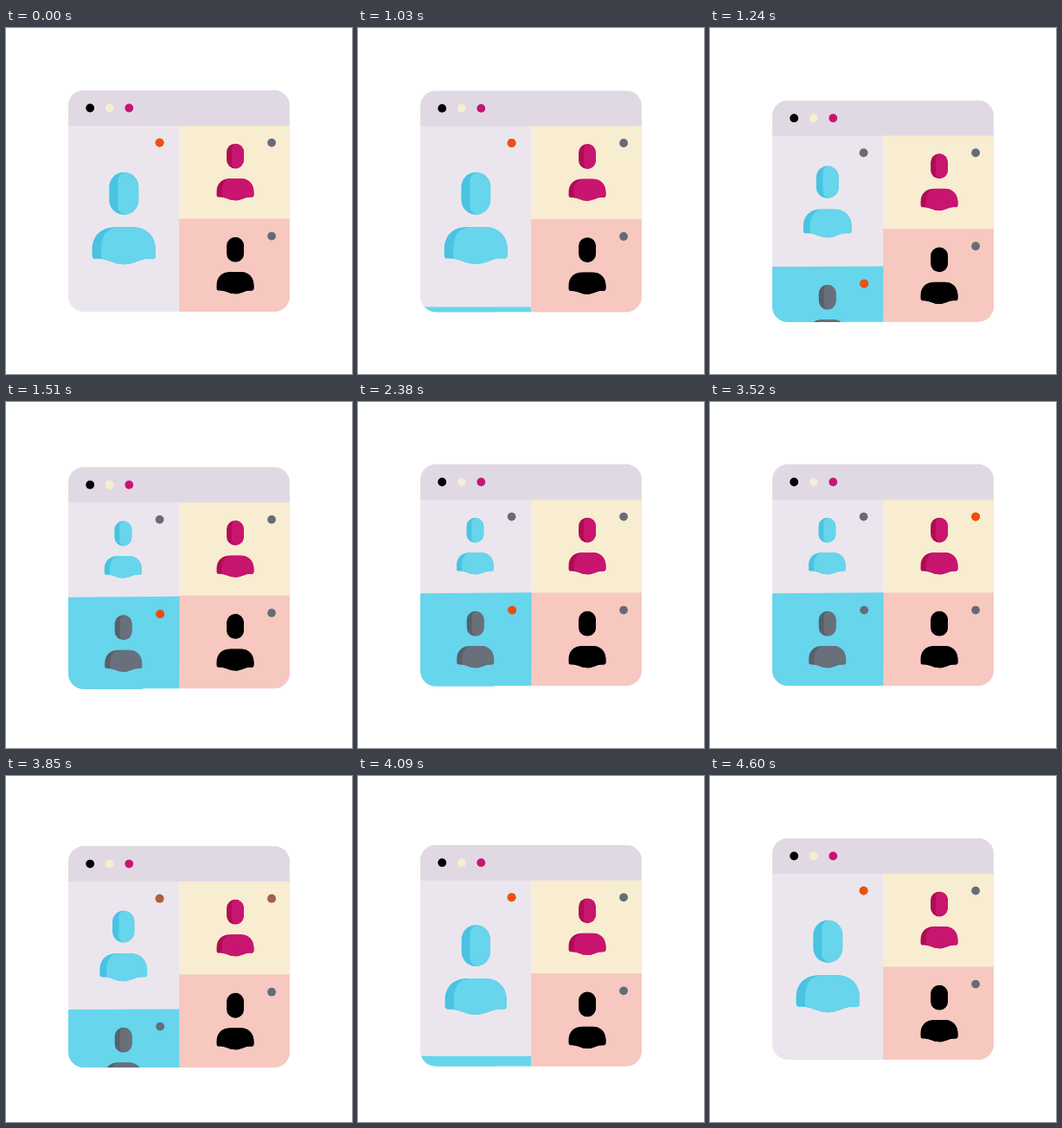
These frames come from a looping animation (400x400 px, 4660 ms). An HTML page with a canvas:

```html
<!DOCTYPE html>
<html lang="en">
<head>
<meta charset="utf-8">
<title>Video call</title>
<style>
  html, body { margin: 0; width: 100%; height: 100%; overflow: hidden; background: #fff; }
  canvas { display: block; width: 100vw; height: 100vh; }
</style>
</head>
<body>
<canvas id="stage" width="400" height="400"></canvas>
<script>
const ctx = document.getElementById('stage').getContext('2d');
const LOOP = 4660;
const GREY = '#646c78', ORANGE = '#f24e0b', CYAN = '#67d5ec';
const BLUE_MAN = [CYAN, '#48c3e3'];
const GREY_MAN = ['#68707b', '#575f69'];
const PINK_MAN = ['#c8156f', '#ae0d52'];
const BLACK_MAN = ['#000', '#000'];

// Both parts are drawn around their own centre at full size.
const HEAD = new Path2D();
HEAD.roundRect(-17, -24.6, 34, 49.2, 17);
const HEAD_LIGHT = new Path2D();
HEAD_LIGHT.roundRect(-7, -24.6, 24, 49.2, [12, 17, 17, 12]);
const BODY = new Path2D(
  'M-36.7 4.5C-36.7 -12 -26 -21.5 -10 -21.5H10C26.5 -21.5 36.7 -11 36.7 5' +
  'V11Q36.7 15.2 32.5 15.2C19 13.5 14 21.5 0 21.5C-14 21.5 -18 14.2 -33 15.2Q-36.7 15.2 -36.7 11Z');
const BODY_LIGHT = new Path2D('M-26.3 24V4.5C-26.3 -12 -19 -21.5 -6 -21.5H40V24Z');

const clamp = x => Math.min(1, Math.max(0, x));
const mix = (a, b, p) => a + (b - a) * p;
const ramp = (t, from, to) => clamp((t - from) / (to - from));
const soft = x => (1 - Math.cos(Math.PI * x)) / 2;
const glide = x => 1 - (1 - x) ** 4 * (1 + 4 * x);

// A dip of the whole window: quick down, slower back up.
function dip(t, start, size, down, up) {
  const mid = start + down;
  return size * (soft(ramp(t, start, mid)) - soft(ramp(t, mid, mid + up)));
}

function rect(x, y, w, h, color) {
  ctx.fillStyle = color;
  ctx.fillRect(x, y, w, h);
}

function dot(x, y, color, alpha = 1) {
  ctx.globalAlpha = alpha;
  ctx.fillStyle = color;
  ctx.beginPath();
  ctx.arc(x, y, 4.9, 0, Math.PI * 2);
  ctx.fill();
  ctx.globalAlpha = 1;
}

function status(x, y, live) {
  dot(x, y, GREY);
  if (live > 0) dot(x, y, ORANGE, live);
}

function part(shape, light, x, y, scale, [main, shade]) {
  ctx.save();
  ctx.translate(x, y);
  ctx.scale(scale, scale);
  ctx.fillStyle = shade;
  ctx.fill(shape);
  ctx.clip(shape);
  ctx.fillStyle = main;
  ctx.fill(light);
  ctx.restore();
}

function person(x, headY, bodyY, scale, colors) {
  part(HEAD, HEAD_LIGHT, x, headY, scale, colors);
  part(BODY, BODY_LIGHT, x, bodyY, scale, colors);
}

function clipWindow(extra) {
  ctx.beginPath();
  ctx.roundRect(72, 72, 256, 256 + extra, 18);
  ctx.clip();
}

function guestPanel(t, open) {
  const leave = ramp(t, 4100, 4380);
  const top = mix(323, 220.7, open) + 5.5 * soft(leave);
  const tilt = 0.5 * open;
  const hang = 0.8 * (1 - ramp(t, 2650, 3200)) * open;
  const shift = top - 220.7;
  ctx.save();
  clipWindow(hang);
  ctx.fillStyle = CYAN;
  ctx.beginPath();
  ctx.moveTo(72, top + tilt);
  ctx.lineTo(200 + 0.6 * open, top - tilt);
  ctx.lineTo(200 + 0.4 * open, 328);
  ctx.lineTo(158, 328);
  ctx.lineTo(157, 330);
  ctx.lineTo(72, 330);
  ctx.fill();
  person(135.7, 256.2 + shift, 294.7 + shift, 0.585, GREY_MAN);
  status(178.2, 240.6 + shift, 1 - ramp(t, 2800, 3000));
  ctx.restore();
}

function draw(t) {
  const open = glide(ramp(t, 1010, 1665)) - glide(ramp(t, 3680, 4335));
  const drop = dip(t, 1000, 12, 270, 370) + dip(t, 2650, 3, 230, 310) + dip(t, 3670, 12, 270, 370);
  const hostLive = 1 - ramp(t, 1080, 1260) + ramp(t, 3750, 3930);
  const rightLive = ramp(t, 2800, 3000) - ramp(t, 3750, 3930);

  rect(0, 0, 400, 400, '#fff');
  ctx.save();
  ctx.translate(0, drop);

  ctx.save();
  clipWindow(0);
  rect(72, 72, 256, 256, '#ebe6ed');
  rect(72, 72, 256, 41, '#e0d9e4');
  rect(200, 113, 128, 108, '#f8ecd1');
  rect(200, 220.5, 128, 108, '#f7c8c0');
  ctx.restore();

  dot(97.2, 92.5, '#000');
  dot(119.8, 92.5, '#f8ecd1');
  dot(142.3, 92.5, '#c8156f');

  person(mix(136.3, 135.4, open), mix(191.3, 148.2, open), mix(251.7, 186.7, open),
    mix(1, 0.585, open), BLUE_MAN);
  status(177.6, 132.6, hostLive);
  person(265, 148.1, 186.7, 0.585, PINK_MAN);
  status(307.1, 132.6, rightLive);
  person(265, 256.2, 294.7, 0.585, BLACK_MAN);
  status(307.1, 240.6, 0);

  if (t >= 1030 && t < 4380) guestPanel(t, open);
  ctx.restore();
}

const begin = performance.now();
function frame() {
  draw((performance.now() - begin) % LOOP);
  requestAnimationFrame(frame);
}
frame();
</script>
</body>
</html>
```
